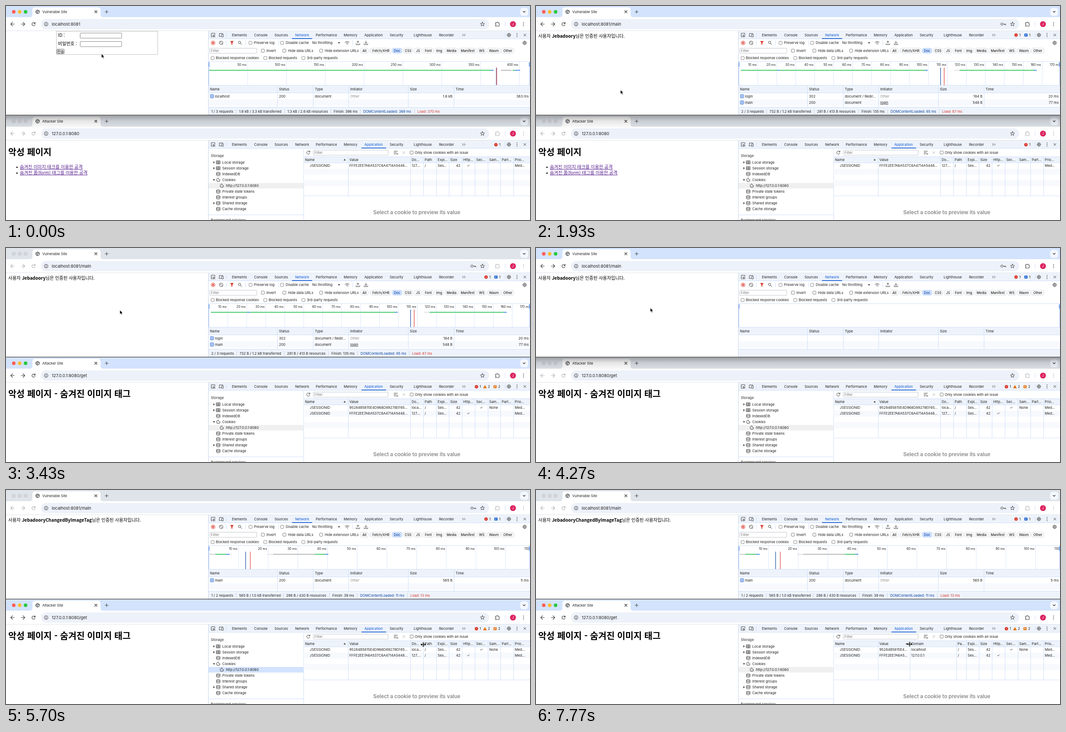
Animation, 1169 px wide and 479 px high, one loop 8.03 s. Source, as an HTML page:

```html
<!DOCTYPE html>
<html lang="ko">
<head>
<meta charset="utf-8">
<title>Request demo</title>
<style>
  html, body { margin: 0; width: 100%; height: 100%; overflow: hidden; background: #fff; }
  #stage, #pointer { position: absolute; left: 0; top: 0; width: 1169px; height: 479px; }
  #stage, #grid { font: 7.75px Inter, "Noto Sans CJK KR", sans-serif; fill: #1f1f1f; color: #1f1f1f; }
  #grid { position: absolute; left: 0; top: 0; width: 1169px; height: 479px; overflow: hidden; }
  #grid span { position: absolute; line-height: 13px; white-space: nowrap; overflow: hidden; text-overflow: ellipsis; }
  #grid i { position: absolute; top: 337px; width: 1px; height: 88px; background: #d0e0fb; }
  .page { font-family: "Noto Sans CJK KR", "Noto Sans CJK", sans-serif; fill: #000; }
  .b { font-weight: 700; }
</style>
</head>
<body>
<svg id="stage" viewBox="0 0 1169 479">
  <defs>
    <linearGradient id="shade" x2="0" y2="1">
      <stop offset="0" stop-color="#000" stop-opacity=".3"/>
      <stop offset=".4" stop-color="#000" stop-opacity=".1"/>
      <stop offset="1" stop-color="#000" stop-opacity="0"/>
    </linearGradient>
  </defs>
</svg>
<div id="grid"></div>
<svg id="pointer" viewBox="0 0 1169 479">
  <g id="arrow"><path d="M0 0V9.2L2.1 7.3L3.6 10.6L5.2 9.9L3.8 6.7H6.6Z" stroke="#fff" stroke-width=".7"/></g>
  <g id="hand"><path d="M-1.2 5V.4Q0-1 1.2.4V3.4L5 4.4Q6 4.8 5.8 6L5 10H-.2L-3.4 6.2Q-3.2 4.6-1.2 6Z" fill="#fff" stroke="#000" stroke-width=".9"/></g>
  <g id="resize"><path d="M-1-5V5M1-5V5M-5 0H5" fill="none" stroke="#fff" stroke-width="2.4"/>
    <path d="M-.8-5V5M.8-5V5M-4 0H4M-3.6-1.8L-5.6 0L-3.6 1.8ZM3.6-1.8L5.6 0L3.6 1.8Z" stroke="#000"/></g>
</svg>
<script>
const LOOP = 8030, W = 1169, DY = 245;
const USER = 'Jebadoory';
const LINE = '#d0e0fb', BAR = '#eef3fb', INK = '#474747', BLUE = '#0b57d0', RED = '#d93025', GREEN = '#1ec04e';
const stage = document.getElementById('stage'), grid = document.getElementById('grid');
const cues = [];
let host = stage;

const cue = (el, spans) => { if (spans) cues.push([el, spans]); return el; };
function add(tag, attrs) {
  const el = document.createElementNS('http://www.w3.org/2000/svg', tag);
  for (const k in attrs) el.setAttribute(k, attrs[k]);
  return host.appendChild(el);
}
function group(spans, draw, y = 0) {
  const parent = host;
  host = cue(add('g', { transform: `translate(0 ${y})` }), spans);
  draw();
  host = parent;
}
const rect = (x, y, width, height, fill, more) => add('rect', { x, y, width, height, fill, ...more });
const vline = (x, y, h, c = LINE) => rect(x, y, 1, h, c);
const hline = (x, y, w, c = LINE) => rect(x, y, w, 1, c);
const disc = (cx, cy, r, fill, more) => add('circle', { cx, cy, r, fill, ...more });
function text(x, cy, str, more = {}) {
  const size = more['font-size'] || 7.75;
  const el = add('text', { x, y: cy + size * .36, ...more });
  el.innerHTML = str;
  return el;
}

const ICONS = {
  back: 'M4 0H-4M0-4L-4 0L0 4',
  next: 'M-4 0H4M0-4L4 0L0 4',
  reload: 'M3.2-1.6A3.6 3.6 0 1 0 3.4 1.4M3.6-4V-1.2H.8',
  close: 'M-2.5-2.5L2.5 2.5M2.5-2.5L-2.5 2.5',
  plus: 'M-3.5 0H3.5M0-3.5V3.5',
  chevron: 'M-2.2-1L0 1.2L2.2-1',
  star: 'M0-4.6L1.3-1.5L4.6-1.3L2.1.8L2.9 4L0 2.2L-2.9 4L-2.1.8L-4.6-1.3L-1.3-1.5Z',
  puzzle: 'M-4-3H-1.4a1.4 1.4 0 0 1 2.8 0H4V0a1.4 1.4 0 0 1 0 2.6V4.5H-4V2.5a1.3 1.3 0 0 0 0-2.6Z',
  key: 'M-.4 0H5.5V2.2M3.3 0V2M-5.6 0a2.6 2.6 0 1 0 5.2 0a2.6 2.6 0 1 0-5.2 0',
  gear: 'M-1.4 0a1.4 1.4 0 1 0 2.8 0a1.4 1.4 0 1 0-2.8 0M-3.4 0a3.4 3.4 0 1 0 6.8 0a3.4 3.4 0 1 0-6.8 0M0-4.6V-3.4M0 4.6V3.4M-4.6 0H-3.4M4.6 0H3.4M-3.2-3.2L-2.5-2.5M3.2 3.2L2.5 2.5M3.2-3.2L2.5-2.5M-3.2 3.2L-2.5 2.5',
  globe: 'M-4 0a4 4 0 1 0 8 0a4 4 0 1 0-8 0M-3.6-1L0 .4L-.6 3.6M-1-3.6L1-1.4L3.6-1.2',
  info: 'M-4 0a4 4 0 1 0 8 0a4 4 0 1 0-8 0M0-.4V2.2M0-2.2V-1.3',
  inspect: 'M-4 1V-4H4V-1M-4 1V4H-1M0 0L4.5 1.5L2.2 2.3L1.3 4.5ZM2.5 2.5L4.5 4.5',
  device: 'M-4 2V-3.5H4M-5 3H0M1.5-1.5H4.8V4H1.5Z',
  block: 'M-4 0a4 4 0 1 0 8 0a4 4 0 1 0-8 0M-2.8-2.8L2.8 2.8',
  search: 'M-3.6-1a2.7 2.7 0 1 0 5.4 0a2.7 2.7 0 1 0-5.4 0M1.2 1L4 4',
  wifi: 'M-4.6-1.4Q0-5 4.6-1.4M-2.8.6Q0-1.6 2.8.6M-.6 2L1.6 4.2',
  up: 'M0 1.6V-4M-2.4-1.8L0-4.2L2.4-1.8M-4 1.6V4H4V1.6',
  down: 'M0-4V1.4M-2.4-.8L0 1.6L2.4-.8M-4 1.6V4H4V1.6',
  list: 'M-4-3H4M-4 0H1M-4 3H-.5M1.5 1.4L4.5 4.4M4.5 1.4L1.5 4.4',
  table: 'M-4-3.5H4V3.5H-4ZM-4-1H4M-4 1.3H4M0-3.5V3.5',
  store: 'M-4-2.6a4 1.4 0 1 0 8 0a4 1.4 0 1 0-8 0V2.6a4 1.4 0 0 0 8 0V-2.6M-4 0a4 1.4 0 0 0 8 0',
  cookie: 'M0-4A4 4 0 1 0 4 0Q2 .4 2-1.6Q-.2-1.4 0-4M-1.6-.6v.1M-1 2v.1M1.4 1.6v.1',
  dots: 'M0-3.5v.01M0 0v.01M0 3.5v.01'
};
const icon = (name, x, y, stroke = INK, w = 1) => add('path', {
  d: ICONS[name], transform: `translate(${x} ${y})`, fill: 'none', stroke,
  'stroke-width': name === 'dots' ? 1.8 : w, 'stroke-linecap': 'round', 'stroke-linejoin': 'round'
});
const tri = (x, y, d, fill = INK) => add('path', { d, fill, transform: `translate(${x} ${y})` });
const box = (x, y, w, h, more) => rect(x + .5, y + .5, w - 1, h - 1, '#fff', { stroke: '#767676', 'stroke-width': .9, rx: 1.2, ...more });
function check(x, y, lx, label) {
  box(x - 4, y - 4, 8, 8, { rx: 1.5 });
  text(lx, y, label);
}

const TOP = [[0, 2180], [3540, 5200]], BOTTOM = [[2180, 3540], [5200, LOOP]];

function browser(y, title, on, off, urls, keySpans) {
  const strip = (fill, lights, edge) => {
    rect(0, 0, W, 25, fill);
    lights.forEach((c, i) => disc(17.3 + 13.2 * i, 13, 4, c, { stroke: edge, 'stroke-width': .5 }));
  };
  const nav = c => {
    icon('back', 14.5, 40.5, c, 1.2);
    icon('next', 38, 40.5, c, 1.2);
    icon('reload', 61.5, 40.5, c, 1.2);
    icon('puzzle', 1096, 40.5, c, 1.1);
    icon('dots', 1154.5, 40.5, c);
  };
  group(null, () => {
    group(on, () => strip('#d3e3fd', ['#ff5f57', '#febc2e', '#28c840'], 'none'));
    group(off, () => strip('#dfe3ea', ['#d2d4d8', '#d2d4d8', '#d2d4d8'], '#c2c5ca'));
    add('path', { d: 'M53 25q6 0 6-6V9q0-6 6-6H205q6 0 6 6V19q0 6 6 6Z', fill: '#fff' });
    rect(0, 25, W, 31, '#fff');
    hline(0, 55, W, '#dfe3ea');
    icon('globe', 70.5, 13, '#3c4043', 1.2);
    text(81, 13, title);
    icon('close', 200.5, 13, '#1f1f1f', 1.1);
    icon('plus', 224.5, 13);
    rect(1147, 4, 18, 18, '#f3f7fe', { rx: 6 });
    icon('chevron', 1156, 13, '#1f1f1f', 1.2);
    rect(78, 29, 1000, 23, '#edf1f9', { rx: 11.5 });
    icon('info', 89.5, 40.5, INK, 1.1);
    for (const [s, spans] of urls) cue(text(102, 40.5, s, { 'font-size': 9.3 }), spans);
    if (keySpans) cue(icon('key', 1042.5, 40.5), keySpans);
    icon('star', 1063, 40.5);
    vline(1113, 35, 11);
    disc(1131, 40.5, 6.6, '#dc2460');
    text(1131, 40.5, 'J', { 'font-size': 7, 'text-anchor': 'middle', fill: '#fff' });
    group(on, () => nav(INK));
    group(off, () => nav('#b4b6ba'));
  }, y);
}

const TABS = { Elements: 504, Console: 553.5, Sources: 599, Network: 645, Performance: 691, Memory: 753.5,
  Application: 799.5, Security: 856, Lighthouse: 909.5, Recorder: 966 };

function devtools(y, active, from, to) {
  group(null, () => {
    rect(451, 56, W - 451, 189, '#fff');
    rect(451, 56, W - 451, 18, BAR);
    hline(451, 73, W - 451);
    icon('inspect', 462, 65);
    icon('device', 480, 65);
    vline(491, 60, 10);
    for (const name in TABS) text(TABS[name], 65, name, name === active ? { fill: BLUE } : {});
    rect(from, 72, to - from, 1.6, BLUE);
    add('path', { d: 'M1018 62.5l2.5 2.5l-2.5 2.5M1022 62.5l2.5 2.5l-2.5 2.5', fill: 'none', stroke: INK });
    vline(1113, 60, 10);
    icon('gear', 1122, 65);
    icon('dots', 1140, 65);
    icon('close', 1157.5, 65);
  }, y);
}
function errorBadge(x, y) {
  disc(x, y, 3.8, RED);
  icon('close', x, y, '#fff', .8).setAttribute('transform', `translate(${x} ${y}) scale(.6)`);
  text(x + 7, y, '1');
}
function noteBadge(x, y, n, c) {
  rect(x - 3.5, y - 3.2, 7, 6.4, c, { rx: 1 });
  rect(x - 2, y - 1.4, 4, .9, '#fff');
  rect(x - 2, y + .5, 3, .9, '#fff');
  text(x + 7, y, n);
}

/* Upper window */
browser(0, 'Vulnerable Site', TOP, BOTTOM, [
  ['localhost:8081', [[0, 1630]]], ['localhost:8081/main', [[1630, LOOP]]]
], [[1230, LOOP]]);
devtools(0, 'Network', 638, 683);
group([[1630, LOOP]], () => { errorBadge(1071, 65); noteBadge(1093, 65, '1', BLUE); });

const PAGE = { class: 'page', 'font-size': 10 };
let idText, caret;
group([[0, 1630]], () => {
  rect(112.5, 56.5, 226, 52, 'none', { stroke: '#c4c4c4' });
  text(116, 65, 'ID :', PAGE);
  text(116, 84, '비밀번호 :', PAGE);
  box(165, 60, 93.5, 12.5);
  cue(box(165, 60, 93.5, 12.5, { fill: '#e8f0fe' }), [[1170, 1630]]);
  box(165, 79, 93.5, 12.5);
  [[60, 470, 1170], [79, 1170, 1600]].forEach(([y, a, b]) =>
    cue(rect(165, y, 93.5, 12.5, 'none', { stroke: '#1a66d2', 'stroke-width': 1.7, rx: 1.5 }), [[a, b]]));
  idText = text(166.5, 66.2, '', { 'font-size': 8.3, fill: '#000' });
  [1300, 1380, 1450, 1530].forEach((at, i) => cue(disc(168 + 3.1 * i, 85.3, 1.25, '#000'), [[at, 1630]]));
  caret = cue(rect(0, 0, .8, 9, '#000'), [[470, 1600]]);
  box(113, 96, 17.5, 11.5, { fill: '#efefef' });
  text(121.8, 101.5, '전송', { class: 'page', 'font-size': 8.4, 'text-anchor': 'middle' });
});
const greet = name => `사용자 <tspan class="b">${name}</tspan>님은 인증된 사용자입니다.`;
cue(text(5, 67, greet(USER), PAGE), [[1770, 4300]]);
cue(text(5, 67, greet(USER + 'ChangedByImageTag'), PAGE), [[4300, LOOP]]);

/* Network panel */
disc(462, 82.5, 4, 'none', { stroke: RED, 'stroke-width': 1.1 });
rect(460.2, 80.7, 3.6, 3.6, RED);
icon('block', 480, 82.5);
vline(491, 77, 11);
tri(504, 82.5, 'M-4-4H4L1 0V4H-1V0Z', RED);
icon('search', 522, 82.5);
vline(534, 77, 11);
check(545.5, 82.5, 553, 'Preserve log');
vline(608, 77, 11);
check(616, 82.5, 624, 'Disable cache');
text(683, 82.5, 'No throttling');
tri(743, 82.5, 'M-2.5-1.5H2.5L0 2Z');
icon('wifi', 761, 82.5);
vline(773, 77, 11);
icon('up', 785, 82.5);
icon('down', 803, 82.5);
icon('gear', 1157, 82.5);

const filterBox = (x, y, w) => {
  rect(x + .5, y - 5.5, w, 11.5, '#fff', { stroke: '#c3c7cf', rx: 1.5 });
  text(x + 3, y + .3, 'Filter', { fill: '#757575' });
};
filterBox(454, 100, 105);
check(573, 100, 581, 'Invert');
check(621, 100, 629, 'Hide data URLs');
check(703, 100, 711, 'Hide extension URLs');
vline(811, 95, 10);
const CHIPS = { All: [791, 17], 'Fetch/XHR': [814, 45], Doc: [862, 21], CSS: [886.5, 21], JS: [911, 16], Font: [930.5, 23],
  Img: [956.5, 20], Media: [980, 28], Manifest: [1011, 38], WS: [1052.5, 18], Wasm: [1074, 29], Other: [1106, 27] };
for (const name in CHIPS) {
  const [x, w] = CHIPS[name], lit = name === 'Doc';
  rect(x, 94.5, w, 11, lit ? '#d3e3fd' : '#fff', { rx: 3, stroke: lit ? '#a8c7fa' : '#c7ccd4', 'stroke-width': .8 });
  text(x + w / 2, 100, name, { 'text-anchor': 'middle', 'font-weight': 500, 'font-size': 7.5, fill: lit ? '#0842a0' : '#1f1f1f' });
}
check(461, 116.5, 468, 'Blocked response cookies');
check(578.5, 116.5, 586, 'Blocked requests');
check(663.5, 116.5, 671, '3rd-party requests');
hline(451, 124, W - 451);

const COLS = [451, 605, 685, 764, 897, 999];
const HEADS = ['Name', 'Status', 'Type', 'Initiator', 'Size', 'Time'];
rect(451, 178, W - 451, 17, BAR);
rect(451, 209, W - 451, 14, '#f7f9fd');
rect(451, 227, W - 451, 17, BAR);
[177, 194, 226].forEach(y => hline(451, y, W - 451));
COLS.forEach((x, i) => { vline(x, 178, 48); text(x + 4, 186.5, HEADS[i]); });

function network(spans, { step, unit, bars, marks, rows, status }) {
  group(spans, () => {
    for (let k = 1; 452 + step * k < W + 12; k++) {
      const x = 452 + step * k;
      vline(x, 125, 52, '#dbe6fa');
      text(x - 2, 131.5, `${k * unit} ms`, { 'text-anchor': 'end', 'font-size': 7 });
    }
    for (const [a, b, c] of bars) rect(a, 143, b - a, 1.6, c);
    for (const [x, c] of marks) rect(x, 138, 1.1, 39, c);
    rows.forEach((cells, r) => {
      const y = 202 + 14 * r;
      rect(456, y - 3.7, 7, 7.4, '#fff', { stroke: BLUE, rx: 1 });
      [-1.6, 0, 1.6].forEach(d => rect(457.6, y + d - .3, 3.8, .7, BLUE));
      cells.forEach((s, i) => {
        if (i > 3) text((COLS[i + 1] || W) - 3, y, s, { 'text-anchor': 'end' });
        else text(i ? COLS[i] + 4 : 466, y, s, s === 'Other' ? { fill: '#8a8a8a' } : s === 'login' && i ? { 'text-decoration': 'underline' } : {});
      });
    });
    status.forEach(([x, s], i) => {
      text(x, 236, s, { fill: ['#1f1f1f', '#0842a0', RED][Math.max(0, i - 3)] });
      if (i) vline(x - 7, 231, 10, '#c9d6ec');
    });
  });
}
const FAST = '#2f7de1', DIM = '#a9a9a9';
network([[0, 1570]], {
  step: 86.6, unit: 50,
  bars: [[453, 1082, GREEN], [1082, 1088, FAST], [1104, 1128, DIM], [1130, 1135, GREEN], [1135, 1147, FAST]],
  marks: [[1093, '#7a86c4'], [1094.2, '#c0272d']],
  rows: [['localhost', '200', 'document', 'Other', '1.6 kB', '363 ms']],
  status: [[458, '1 / 3 requests'], [520, '1.6 kB / 3.3 kB transferred'], [628, '1.3 kB / 2.6 kB resources'],
    [731, 'Finish: 396 ms'], [797, 'DOMContentLoaded: 369 ms'], [918, 'Load: 370 ms']]
});
network([[1600, 4270]], {
  step: 42.3, unit: 10,
  bars: [[457, 538, GREEN], [538, 544, FAST], [544, 868, GREEN], [868, 874, FAST],
    [933, 945, '#dcdcdc'], [945, 1110, GREEN], [1110, 1117, FAST]],
  marks: [[902, '#0842a0'], [910, RED]],
  rows: [['login', '302', 'document / Redir…', 'Other', '184 B', '20 ms'], ['main', '200', 'document', 'login', '548 B', '77 ms']],
  status: [[458, '2 / 3 requests'], [521, '732 B / 1.2 kB transferred'], [627, '281 B / 413 B resources'],
    [726, 'Finish: 135 ms'], [791, 'DOMContentLoaded: 85 ms'], [906, 'Load: 87 ms']]
});
network([[4300, LOOP]], {
  step: 66.2, unit: 10,
  bars: [[454, 467, '#c4c4c4'], [467, 491, GREEN], [491, 499, FAST], [583, 596, '#dcdcdc'], [596, 689, DIM], [689, 712, GREEN], [712, 719, FAST]],
  marks: [[534, '#0842a0'], [544.5, RED]],
  rows: [['main', '200', 'document', 'Other', '565 B', '5 ms']],
  status: [[458, '1 / 2 requests'], [520, '565 B / 1.0 kB transferred'], [625, '298 B / 430 B resources'],
    [728, 'Finish: 39 ms'], [790, 'DOMContentLoaded: 11 ms'], [902, 'Load: 13 ms']]
});
[452, 1167.5].forEach(x => { rect(x, 125, 1, 52, '#9dbdf5'); rect(x - 1, 126, 3, 10, '#7aa7f0', { rx: 1.5 }); });
vline(451, 56, 188, '#c9d6ec');

/* Lower window */
rect(0, 245, W, 234, '#fff');
browser(DY, 'Attacker Site', BOTTOM, TOP, [
  ['127.0.0.1:8080', [[0, 2770]]], ['127.0.0.1:8080/get', [[2770, LOOP]]]
]);
devtools(DY, 'Application', 793, 848);
rect(451, 319, W - 451, 160, '#fff');
group([[0, 2830]], () => errorBadge(1093, 310.5));
group([[2830, LOOP]], () => {
  errorBadge(1049.5, 310.5);
  tri(1068.5, 310.5, 'M0-3.8L4.2 3.4H-4.2Z', '#e8710a');
  text(1075, 310.5, '2');
  noteBadge(1091, 310.5, '2', '#e8710a');
});
group([[0, 2800]], () => {
  text(5, 326.5, '악성 페이지', { class: 'page b', 'font-size': 19.8 });
  ['숨겨진 이미지 태크를 이용한 공격', '숨겨진 폼(form) 태그를 이용한 공격'].forEach((s, i) => {
    disc(24.5, 361 + 13 * i, 1.6, '#000');
    text(31, 360.3 + 12.8 * i, s, { ...PAGE, style: 'fill:#551a8b', 'text-decoration': 'underline' });
  });
});
cue(text(5, 326.5, '악성 페이지 - 숨겨진 이미지 태그', { class: 'page b', 'font-size': 19.9 }), [[2800, LOOP]]);

/* Storage sidebar */
rect(452, 396, 212, 12.5, '#f0f0f0');
cue(rect(452, 396, 212, 12.5, '#d3e3fd'), [[5700, 7230]]);
text(457, 335.5, 'Storage', { 'font-weight': 500, fill: INK });
const RIGHT = 'M-1.5-2.6L2-0L-1.5 2.6Z', OPEN = 'M-2.6-1.5H2.6L0 2Z';
[['Local storage', 'table', RIGHT], ['Session storage', 'table', RIGHT], ['IndexedDB', 'store'], ['Cookies', 'cookie', OPEN],
  ['http://127.0.0.1:8080', 'cookie'], ['Private state tokens', 'store'], ['Interest groups', 'store'],
  ['Shared storage', 'store', RIGHT], ['Cache storage', 'store']].forEach(([s, name, mark], i) => {
  const y = 350 + 13.05 * i, dx = i === 4 ? 8 : 0;
  if (mark) tri(464, y, mark);
  icon(name, 473.5 + dx, y);
  text(482.5 + dx, y, s);
});
hline(452, 467, 212);
text(457, 479, 'Background services', { 'font-weight': 500, fill: INK });
vline(451, 301, 178, '#c9d6ec');
vline(663.5, 320, 159);

/* Cookie table */
icon('reload', 674.5, 328);
filterBox(685, 328, 167);
icon('list', 869.5, 328);
icon('close', 887.5, 328, '#b4b6ba');
check(905, 328, 912, 'Only show cookies with an issue');
rect(664, 337, W - 664, 14, BAR);
rect(664, 364, W - 664, 13, '#f7f9fd');
rect(664, 390, W - 664, 13, '#f7f9fd');
[337, 350.5, 424.5].forEach(y => hline(664, y, W - 664));
text(916.5, 462, 'Select a cookie to preview its value', { 'font-size': 11.5, 'font-weight': 600, 'text-anchor': 'middle', fill: '#8b8b8b' });

const EDGES = [664, 763, 902, 931, 960, 988, 1017, 1046, 1075, 1103, 1132, W];
const edge = i => i === 2 ? 'var(--domain)' : i === 3 ? 'var(--path)' : EDGES[i] + 'px';
function cell(col, y, str, spans, pad = 3, align = 'left') {
  const el = grid.appendChild(document.createElement('span'));
  el.textContent = str;
  el.style.cssText = `top:${y - 6.5}px;left:calc(${edge(col)} + ${pad}px);text-align:${align};`
    + `width:calc(${edge(col + 1)} - ${edge(col)} - ${pad + 3.2}px)`;
  if (col > 2) el.style.textOverflow = 'clip';
  cue(el, spans);
}
for (let i = 1; i < 11; i++) grid.appendChild(document.createElement('i')).style.left = edge(i);
['Name', 'Value', 'Domain', '', 'Expi…', 'Size', 'Http…', 'Sec…', 'Sam…', 'Part…', 'Prio…'].forEach((s, i) => cell(i, 344, s));
const NARROW = 5800;
cell(3, 344, 'Path', [[0, NARROW]]);
cell(3, 344, 'Pa…', [[NARROW, LOOP]], 2.5);
function cookieRow(y, value, domain, secure, spans) {
  cell(0, y, 'JSESSIONID', spans, 13.5);
  [value, domain, '/', 'Ses…'].forEach((s, i) => cell(i + 1, y, s, spans));
  cell(5, y, '42', spans, 3, 'right');
  cell(secure ? 7 : 6, y, '✓', spans, 3, 'center');
  if (secure) cell(8, y, 'None', spans);
  cell(10, y, 'Med…', spans);
}
const OLD = ['FFFE2EE7A6A537C6A4714A5448B1D07C', '127.0.0.1', false];
cookieRow(357.5, ...OLD, [[0, 2830]]);
cookieRow(357.5, '95284B5815E4D968D89278EF65A20C3B', 'localhost', true, [[2830, LOOP]]);
cookieRow(370.7, ...OLD, [[2830, LOOP]]);
const UP = 'M-2.4 1.8L0-2L2.4 1.8Z';
cue(tri(755.5, 344, UP), [[0, 7470]]);
cue(tri(827, 344, UP), [[7470, LOOP]]);

group(TOP, () => rect(0, 245, W, 30, 'url(#shade)'));
rect(0, 243.6, W, 1.2, '#2b2b2b');

/* Pointer path: time, x, y, shape from then on */
const PATH = [
  [0, 213, 107, 'arrow'], [30, 213, 107, 'arrow'], [230, 207, 66, 'arrow'], [730, 207, 66, ''],
  [1770, 207, 66, 'arrow'], [2140, 161, 368, 'hand'], [2500, 161, 368, 'hand'], [2700, 122, 357, 'hand'],
  [2800, 122, 357, 'arrow'], [3030, 122, 357, 'arrow'], [3430, 254, 139, 'arrow'], [3570, 255, 134, 'arrow'],
  [4570, 255, 134, 'arrow'], [5130, 930, 344, 'arrow'], [5230, 931, 343, 'arrow'],
  [5470, 931, 346, 'resize'], [5700, 931, 346, 'resize'], [6000, 978, 346, 'resize'], [6060, 976, 346, 'arrow'],
  [6370, 910, 347, 'arrow'], [6500, 902.5, 347, 'arrow'], [6530, 902.5, 347.5, 'resize'], [6730, 902.5, 347.5, 'resize'],
  [7070, 833.5, 345, 'resize'], [7730, 833.5, 342, 'arrow'], [7770, 833.5, 345, 'resize'], [LOOP, 833.5, 345, 'resize']
];
const shapes = ['arrow', 'hand', 'resize'].map(id => document.getElementById(id));
function pointerAt(t) {
  const i = PATH.findIndex(p => p[0] > t), [t0, x0, y0, shape] = PATH[i - 1], [t1, x1, y1] = PATH[i];
  const u = (t - t0) / (t1 - t0), e = t1 - t0 > 500 && shape === 'resize' ? 0 : u * u * (3 - 2 * u);
  return { x: x0 + (x1 - x0) * e, y: y0 + (y1 - y0) * e, shape };
}

function render(t) {
  for (const [el, spans] of cues) el.style.display = spans.some(([a, b]) => t >= a && t < b) ? '' : 'none';
  const p = pointerAt(t);
  for (const el of shapes) {
    el.style.display = el.id === p.shape ? '' : 'none';
    el.setAttribute('transform', `translate(${p.x} ${p.y})`);
  }
  const path = t < 5700 ? 931 : t < 6000 ? Math.min(938, p.x) : 938;
  const domain = t < 6730 ? 902 : t < 7070 ? p.x : 834;
  grid.style.setProperty('--path', path + 'px');
  grid.style.setProperty('--domain', domain + 'px');

  if (t < 1630) {
    idText.textContent = t < 730 ? '' : USER.slice(0, 1 + Math.floor((t - 730) / 45));
    const dots = [1300, 1380, 1450, 1530].filter(at => t >= at).length;
    const inPass = t >= 1170;
    caret.setAttribute('x', inPass ? 167 + 3.1 * dots : 167 + (t < 730 ? 0 : idText.getComputedTextLength()));
    caret.setAttribute('y', inPass ? 81 : 62);
  }
}
const start = performance.now();
(function tick() {
  render((performance.now() - start) % LOOP);
  requestAnimationFrame(tick);
})();
</script>
</body>
</html>
```
